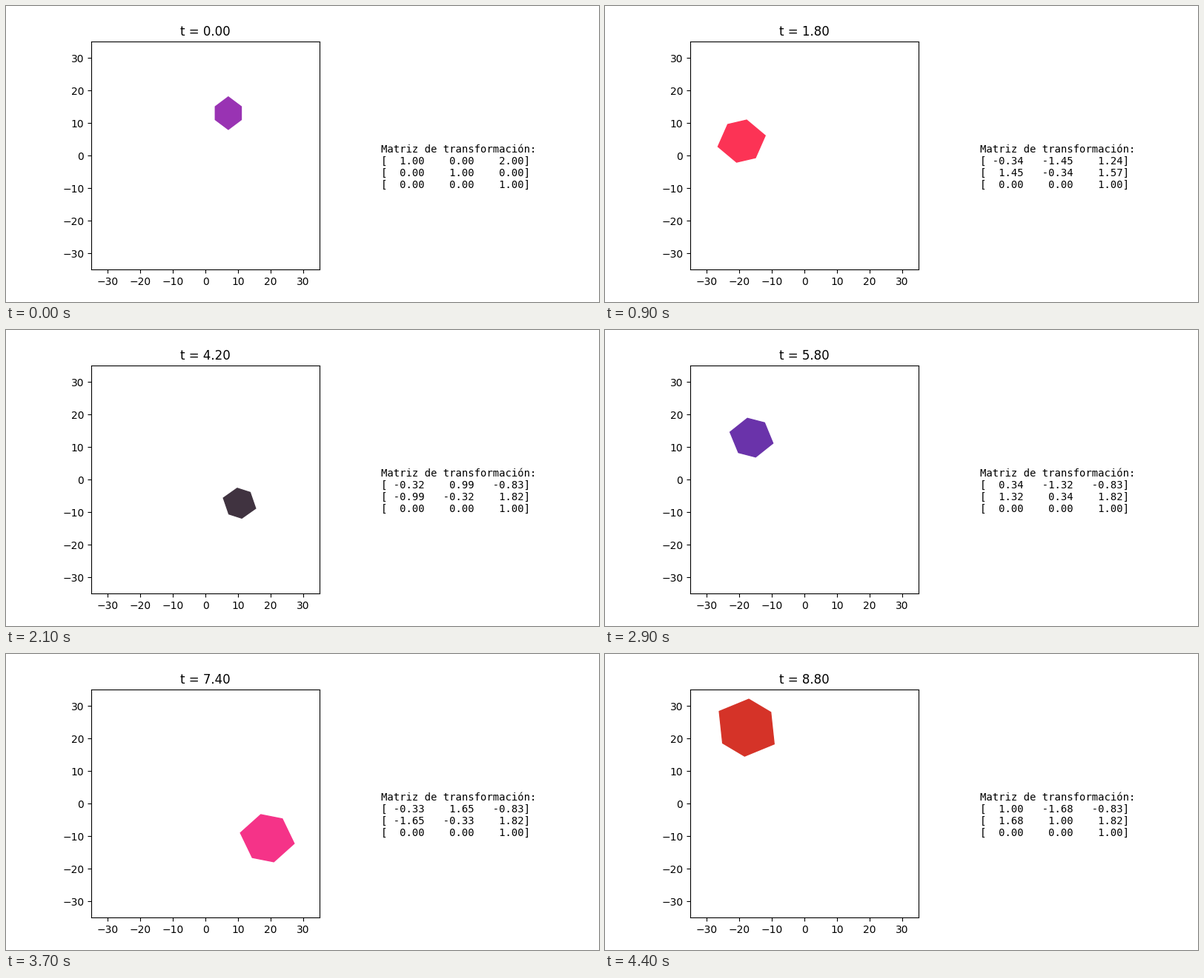
Animation of 800 by 400 pixels, one loop 4.5 s. Source, as a matplotlib script:

```python
import matplotlib.pyplot as plt
import numpy as np
from matplotlib.animation import FuncAnimation
from matplotlib.patches import Polygon

FRAMES = 45
STEP = 0.2
SWITCH = 4.0  # time at which the second movement takes over

HEXAGON = np.array([(5, 8), (9, 11), (9, 15), (5, 18), (1, 15), (1, 11)])


def transform(t):
    """Homogeneous matrix: scale and rotate, then translate."""
    if t < SWITCH:
        scale, angle = 1 + 0.5 * np.sin(t), t
    else:
        scale, angle = 1 + 0.2 * (t - SWITCH), SWITCH + 2 * (t - SWITCH)
    c, s = scale * np.cos(angle), scale * np.sin(angle)
    orbit = min(t, SWITCH) / 2
    # adding 0.0 turns -0.0 into 0.0
    return np.array([[c, -s, 2 * np.cos(orbit)],
                     [s, c, 2 * np.sin(orbit)],
                     [0, 0, 1]]) + 0.0


def color(t):
    return 0.6 + 0.4 * np.sin(t), 0.2, 0.4 + 0.3 * np.cos(t)


def matrix_text(m):
    rows = ["[" + "  ".join(f"{v:6.2f}" for v in row) + "]" for row in m]
    return "\n".join(["Matriz de transformación:"] + rows)


fig, (ax, side) = plt.subplots(
    1, 2, figsize=(8, 4), dpi=100, gridspec_kw={"width_ratios": [3, 2]})
ax.set_xlim(-35, 35)
ax.set_ylim(-35, 35)
ax.set_aspect("equal")
ticks = range(-30, 31, 10)
ax.set_xticks(ticks)
ax.set_yticks(ticks)
side.axis("off")

shape = ax.add_patch(Polygon(HEXAGON, closed=True))
title = ax.set_title("")
label = side.text(0.05, 0.55, "", transform=side.transAxes, fontsize=10,
                  family="DejaVu Sans Mono", va="top")


def update(frame):
    t = frame * STEP
    m = transform(t)
    shape.set_xy(HEXAGON @ m[:2, :2].T + m[:2, 2])
    shape.set_color(color(t))
    title.set_text(f"t = {t:.2f}")
    label.set_text(matrix_text(m))
    return shape, title, label


anim = FuncAnimation(fig, update, frames=FRAMES, interval=100,
                     repeat=True, repeat_delay=0, blit=False)
plt.show()
```
